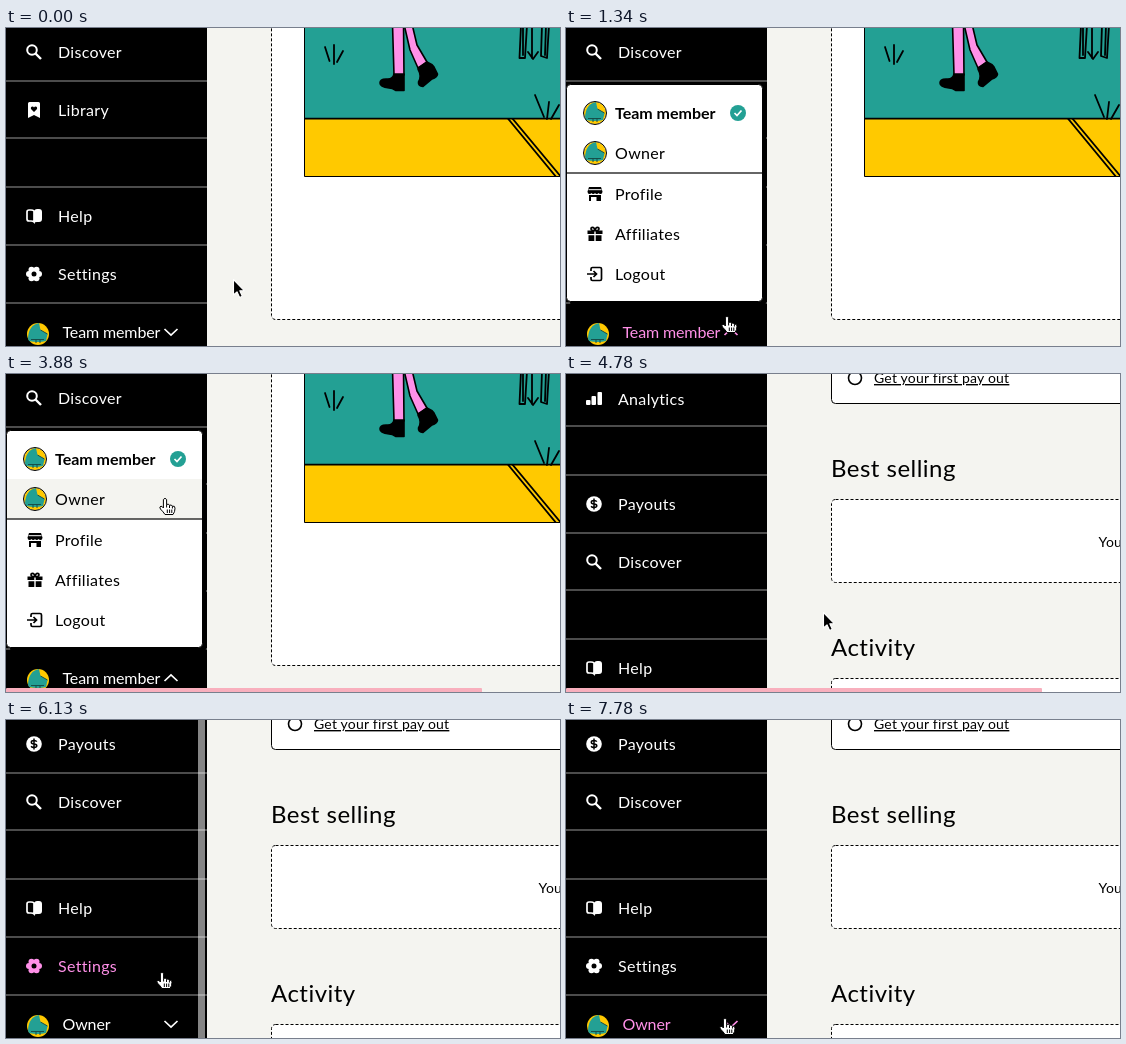
An HTML page that plays this animation: 554 px wide and 318 px high, repeating every 8 s.

```html
<!DOCTYPE html>
<html lang="en">
<head>
<meta charset="utf-8">
<title>Switching roles</title>
<style>
  html, body { margin: 0; width: 100%; height: 100%; overflow: hidden; background: #f4f4f0; }
  svg { display: block; width: 100vw; height: 100vh; }
  text { font: 16px Lato, "Open Sans", sans-serif; letter-spacing: .02em; fill: currentColor; white-space: pre; }
  .h2 { font-size: 24px; }
  .small { font-size: 14px; letter-spacing: .015em; }
  .bold { font-weight: 700; letter-spacing: 0; }
  .user { letter-spacing: -.008em; }
  .dash { fill: #fff; stroke: #000; stroke-dasharray: 3 2; }
  .ink { fill: none; stroke: #000; stroke-width: 1.8; stroke-linecap: round; stroke-linejoin: round; }
  .line { fill: none; stroke: currentColor; stroke-width: 2; }
</style>
</head>
<body>
<svg viewBox="0 0 554 318">
  <defs>
    <g id="search"><circle class="line" cx="-2" cy="-2" r="4.800"/><path class="line" d="M1.500 1.500L7 7" style="stroke-width:2.400"/></g>
    <g id="bookmark"><path fill="currentColor" d="M-6-6.500q0-1.500 1.500-1.500h9q1.500 0 1.500 1.500V8L0 5-6 8z"/><path d="M0 2L-3-1Q-3.600-3.600-1.500-3.600-.5-3.600 0-2.600 .5-3.600 1.500-3.600 3.600-3.600 3-1z"/></g>
    <g id="book"><path class="line" style="stroke-width:1.700" d="M0-5Q-1-6-3-6H-5Q-7-6-7-4V3Q-7 5-5 5H-3Q-1 5 0 6z"/><path fill="currentColor" d="M0-5Q1-7 3-7H5Q8-7 8-4V3Q8 6 5 6H3Q1 6 0 7z"/></g>
    <g id="bars" fill="currentColor"><rect x="-8" y="1" width="4.500" height="5" rx="1"/><rect x="-2.500" y="-3" width="4.500" height="9" rx="1"/><rect x="3.500" y="-7" width="4.500" height="13" rx="1"/></g>
    <g id="coin"><circle r="7.800" fill="currentColor"/><path d="M2.800-2.300Q2-3.500 0-3.500-2.700-3.500-2.700-1.700-2.700-.2 0 0 2.800.3 2.800 1.800 2.800 3.500 0 3.500-2 3.500-2.900 2.200M0-5.500V5.500" fill="none" stroke="#000" stroke-width="1.500"/></g>
    <g id="gear"></g>
    <g id="store"><path fill="currentColor" d="M-6-7H6L7.500-2.500Q7.500 0 5.500 0 4 0 3.700-1 3 0 1.800 0 .5 0 0-1-.5 0-1.800 0-3 0-3.700-1-4 0-5.500 0-7.500 0-7.500-2.500z"/><path fill="currentColor" d="M-6 1H6V7H1.500V3H-4V7H-6z"/><path d="M-6.500-4.300H6.500" stroke="#fff"/></g>
    <g id="gift"><path fill="currentColor" d="M-7.500-3.500H-.7V0H-7.500zM.7-3.500H7.500V0H.7zM-6.500 1.200H-.7V7H-6.500zM.7 1.200H6.500V7H.7z"/><path class="line" style="stroke-width:1.700" d="M0-3.500Q-4-3-4-5.200-4-6.600-2.500-6.600-.6-6.600 0-3.500 .6-6.600 2.500-6.600 4-6.600 4-5.200 4-3 0-3.500z"/></g>
    <g id="exit"><path class="line" style="stroke-width:1.700" d="M-4-3V-5Q-4-6.500-2.500-6.500H5Q6.500-6.500 6.500-5V5Q6.500 6.500 5 6.500H-2.500Q-4 6.500-4 5V3M-8 0H1.500M-1.500-3L1.500 0-1.500 3"/></g>
    <g id="avatar"><circle r="11" fill="#ffc900"/><path d="M-10 4.500Q-9.500-9 1-11L2.500-4 9.500 0 8 7Q0 9-9 7z" fill="#23a094"/><path d="M-7 5.500H6M-2 5.500V9M2 5.500V9M2.500-4L9.500 0" stroke="#174f4a" fill="none"/></g>
    <path id="chevron" class="line" style="stroke-width:1.700" d="M-6.500-3L0 3 6.500-3"/>
    <clipPath id="pave"><path d="M299 91H554V149H299z"/></clipPath>
  </defs>

  <g id="pageA">
    <rect class="dash" x="265.500" y="-20" width="400" height="311.500" rx="4"/>
    <path d="M298.500-5H560V91H298.500z" fill="#23a094"/>
    <path d="M298.500 91H560V148.500H298.500z" fill="#ffc900"/>
    <path d="M298.500-5V148.500H560" fill="none" stroke="#000"/>
    <path d="M298 90.700H560" stroke="#000" stroke-width="1.700"/>
    <path class="ink" clip-path="url(#pave)" d="M501.500 90L551 150M506 90L556 150"/>
    <g stroke="#000" stroke-width="1.600" stroke-linejoin="round">
      <path d="M386.500-4L388 47H398L397.500-4z" fill="#ff90e8"/>
      <path d="M398-4L404 22 412 40 421 34 411 17 406-4z" fill="#ff90e8"/>
      <path d="M388 46H398V62.500H390Q386 60 383 60 374 59 374 55 374 51 380 51 387 52 388 46z"/>
      <path d="M412 41L421 34Q426 36 428 39L431.500 46Q431 49 426 51L417 58.500Q412 58 412.500 54 416 48 412 41z"/>
    </g>
    <path class="ink" d="M319 19L323.500 33M328 17V36M337 23L331 34M529 67L538 89M543 74L541 91M553 77L545 91"/>
    <path class="ink" d="M515-3L513.500 30H519L521-3M517-3V27M526-3V30M522 24L527 31 532 24M536-3L535 28 541 30 543-3M540-3L539 27"/>
  </g>

  <g id="pageB">
    <rect x="265.500" y="-20" width="400" height="49.500" rx="4" fill="#fff" stroke="#000"/>
    <circle cx="289" cy="4" r="6.500" fill="none" stroke="#000" stroke-width="1.600"/>
    <text class="small" x="308" y="9" text-decoration="underline">Get your first pay out</text>
    <text class="h2" x="265" y="103">Best selling</text>
    <rect class="dash" x="265.500" y="125.500" width="400" height="83" rx="4"/>
    <text class="small" x="532.500" y="173">You</text>
    <text class="h2" x="265" y="282">Activity</text>
    <rect class="dash" x="265.500" y="304.500" width="400" height="60" rx="4"/>
  </g>

  <rect width="201" height="318"/>
  <g id="sideA" color="#fff"></g>
  <g id="sideB" color="#fff"></g>
  <rect id="scrollbar" x="192" width="7" height="318" fill="#fff"/>

  <g id="menu" color="#000">
    <rect x="4" y="60" width="196" height="218" rx="4"/>
    <rect x=".5" y="56.500" width="196" height="217" rx="4" fill="#fff" stroke="#000"/>
    <rect id="hover" x="1" width="195" height="40" fill="#f4f4f0"/>
    <path d="M1 145H196" stroke="#333" stroke-width="1.500"/>
    <circle cx="172" cy="85" r="8" fill="#23a094"/>
    <path d="M168.500 85L171 87.500 175.500 82.500" fill="none" stroke="#fff" stroke-width="1.700"/>
  </g>

  <rect id="bar" y="314" width="476" height="5" rx="1" fill="#f8afbd"/>

  <g id="cursor" stroke-linejoin="round">
    <path id="arrow" d="M-.5-.5V15L3 11.800 5.600 17.500 8.300 16.300 5.800 10.800H10.500z" stroke="#fff" stroke-width="1.100"/>
    <g id="hand" stroke="#000" fill="#fff">
      <path d="M-1.600 1.500Q0-1 1.600 1.500V6.500Q3.600 5.300 4.500 7.300 6.500 6.200 7.400 8.200 10 7.500 10 10.200 10 14 8 16.500H0Q-1.500 14-4.600 11-6 8.500-4 8.200-2.700 8.300-1.600 10z"/>
      <path d="M1.600 6.500V9.500M4.500 7.300V10M7.400 8.200V10.500M2.300 11.500V15M4.600 11.500V15M6.800 11.500V15" fill="none"/>
    </g>
  </g>
</svg>
<script>
const LOOP = 8000, PINK = '#ff90e8', WHITE = '#fff';
const $ = id => document.getElementById(id);

function add(parent, tag, attrs, label) {
  const el = document.createElementNS('http://www.w3.org/2000/svg', tag);
  for (const k in attrs) el.setAttribute(k, attrs[k]);
  if (label) el.textContent = label;
  return parent.appendChild(el);
}

const icon = (parent, id, x, y) => add(parent, 'use', { href: '#' + id, transform: `translate(${x} ${y})` });

// Hard steps: each [time, value] holds until the next one.
function play(el, prop, steps) {
  el.animate(
    [...steps, [LOOP, steps[0][1]]].map(([t, v]) => ({ offset: t / LOOP, [prop]: v, easing: 'step-end' })),
    { duration: LOOP, iterations: Infinity });
}

const show = (el, from, to) =>
  play(el, 'opacity', [...(from ? [[0, 0]] : []), [from, 1], ...(to < LOOP ? [[to, 0]] : [])]);
const tint = (el, from, to) =>
  play(el, 'color', [[0, WHITE], [from, PINK], ...(to < LOOP ? [[to, WHITE]] : [])]);

function row(side, name, label, y) {
  const g = add(side, 'g');
  icon(g, name, 28, y);
  add(g, 'text', { x: 52, y: y + 6 }, label);
  return g;
}

function user(side, label) {
  const g = add(side, 'g');
  icon(g, 'avatar', 32, 306);
  add(g, 'text', { x: 56.5, y: 310, class: 'user' }, label);
  return g;
}

function rules(side, ys) {
  for (const y of ys) add(side, 'rect', { y: y - 1, width: 201, height: 2, fill: '#4c4c4c' });
}

for (let i = 0; i < 6; i++) {
  const a = i * Math.PI / 3;
  add($('gear'), 'circle', { cx: 5 * Math.cos(a), cy: 5 * Math.sin(a), r: 3, fill: 'currentColor' });
}
add($('gear'), 'circle', { r: 5.8, fill: 'currentColor' });
add($('gear'), 'circle', { r: 2.5 });

const sideA = $('sideA'), sideB = $('sideB'), menu = $('menu');

rules(sideA, [53, 110, 159, 217, 275]);
row(sideA, 'search', 'Discover', 24);
row(sideA, 'bookmark', 'Library', 82);
row(sideA, 'book', 'Help', 188);
row(sideA, 'gear', 'Settings', 246);
const member = user(sideA, 'Team member');
const down = icon(member, 'chevron', 165, 304);
const up = add(member, 'use', { href: '#chevron', transform: 'translate(165 304) scale(1 -1)' });

rules(sideB, [-54, -5, 53, 110, 159, 217, 275]);
row(sideB, 'bars', 'Analytics', -81);
row(sideB, 'coin', 'Payouts', 24);
row(sideB, 'search', 'Discover', 82);
row(sideB, 'book', 'Help', 188);
const settings = row(sideB, 'gear', 'Settings', 246);
const owner = user(sideB, 'Owner');
icon(owner, 'chevron', 165, 304);

[['avatar', 'Team member', 85], ['avatar', 'Owner', 125], ['store', 'Profile', 166],
 ['gift', 'Affiliates', 206], ['exit', 'Logout', 246]].forEach(([name, label, y], i) => {
  icon(menu, name, 29, y);
  if (name === 'avatar') add(menu, 'circle', { cx: 29, cy: y, r: 11.5, fill: 'none', stroke: '#000' });
  add(menu, 'text', { x: 49, y: y + 6, class: i ? '' : 'bold' }, label);
});

// Pages and overlays
show($('pageA'), 0, 4480);
show(sideA, 0, 4480);
show($('pageB'), 4480, LOOP);
show(sideB, 4480, LOOP);
show(menu, 1340, 4480);
show(down, 0, 1340);
show(up, 1340, LOOP);
show($('bar'), 3880, 5080);

// Hover states
tint(member, 600, 1790);
tint(settings, 6130, 6730);
tint(owner, 6730, LOOP);
show($('hover'), 1940, LOOP);
const moveY = steps => steps.map(([t, y]) => [t, `translate(0px, ${y}px)`]);
play($('hover'), 'transform', moveY([[0, 227], [2090, 187], [2240, 147], [2380, 105]]));

// Sidebar scroll
play(sideB, 'transform', moveY([[0, 106], [5680, 42], [5830, 0]]));
play($('scrollbar'), 'opacity', [[0, 0], [5680, .52], [6280, .25], [6430, 0]]);

// time, x, y of the pointer tip
const path = [
  [0, 228, 252], [450, 205, 266], [600, 172, 284], [740, 161, 288],
  [1790, 161, 268], [1940, 161, 235], [2090, 160, 192], [2240, 159, 150], [2380, 159, 114], [2680, 159, 119], [2830, 159, 124],
  [4480, 175, 150], [4630, 215, 195], [4780, 258, 239],
  [5080, 225, 245], [5230, 180, 250], [5380, 156, 252],
  [6430, 150, 258], [6580, 138, 269], [6730, 121, 283], [6880, 109, 293], [7030, 103, 298],
  [7180, 113, 298], [7330, 127, 298], [7480, 141, 298], [7630, 152, 298], [7780, 159, 298]
];
play($('cursor'), 'transform', path.map(([t, x, y]) => [t, `translate(${x}px, ${y}px)`]));
const grip = [[0, 0], [600, 1], [4480, 0], [6130, 1]];
play($('hand'), 'opacity', grip);
play($('arrow'), 'opacity', grip.map(([t, v]) => [t, 1 - v]));
</script>
</body>
</html>
```
